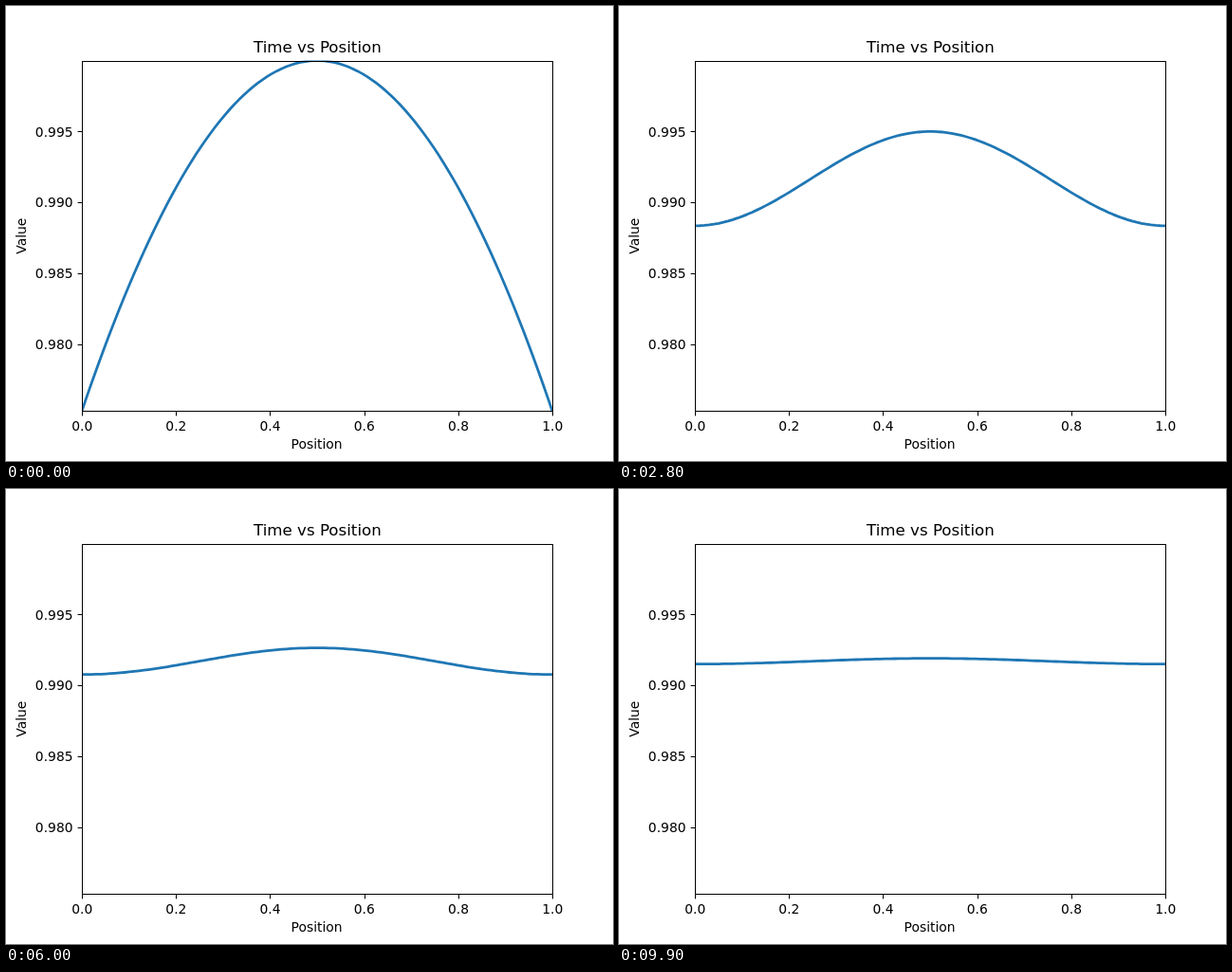
An HTML page that plays this animation: 640x480 px, repeating every 10 s.

```html
<!DOCTYPE html>
<html lang="en">
<head>
<meta charset="utf-8">
<title>Time vs Position</title>
<style>
  html, body { margin: 0; width: 100%; height: 100%; overflow: hidden; background: #fff; }
  svg { display: block; width: 640px; height: 480px; }
  text { font: 13.889px "DejaVu Sans", sans-serif; text-anchor: middle; }
  .title { font-size: 16.667px; }
  .right { text-anchor: end; }
  .axis { fill: none; stroke: #000; stroke-width: 1; }
  #curve { fill: none; stroke: #1f77b4; stroke-width: 2.78; stroke-linejoin: round; stroke-linecap: square; }
</style>
</head>
<body>
<svg viewBox="0 0 640 480">
  <clipPath id="plot"><rect x="80" y="57.6" width="496" height="369.6"/></clipPath>
  <path id="curve" clip-path="url(#plot)"/>
  <rect class="axis" x="80.5" y="58.5" width="496" height="369" shape-rendering="crispEdges"/>
  <g id="ticks"></g>
  <text class="title" x="328.4" y="49">Time vs Position</text>
  <text x="327.6" y="467">Position</text>
  <text transform="translate(21 242.7) rotate(-90)">Value</text>
</svg>
<script>
const LEFT = 80, TOP = 57.6, WIDTH = 496, HEIGHT = 369.6;
const STEP = 100, LOOP = 10000;
const DIFFUSIVITY = 0.01, MODES = 24, SAMPLES = 400, POINTS = 100;
const GRID_LOSS = 1.7e-5; // small offset of the mean from the coarse grid

const initial = x => Math.exp(-0.1 * (x - 0.5) ** 2);
const low = initial(0);
const toX = x => LEFT + WIDTH * x;
const toY = v => TOP + HEIGHT * (1 - v) / (1 - low);

// Cosine coefficients of the starting profile, insulated at both ends
const modes = Array.from({ length: MODES }, (_, n) => {
  let sum = 0;
  for (let i = 0; i < SAMPLES; i++) {
    const x = (i + 0.5) / SAMPLES;
    sum += initial(x) * Math.cos(2 * Math.PI * n * x);
  }
  return sum / SAMPLES * (n ? 2 : 1);
});

function heat(x, t) {
  if (t === 0) return initial(x);
  return modes.reduce((sum, a, n) => {
    const k = 2 * Math.PI * n;
    return sum + a * Math.exp(-DIFFUSIVITY * k * k * t) * Math.cos(k * x);
  }, -GRID_LOSS);
}

function drawTicks() {
  let out = '';
  for (let i = 0; i <= 5; i++) {
    const x = toX(i / 5), px = Math.round(x) + 0.5;
    out += `<path class="axis" d="M${px} 428v4.4"/><text x="${x + 0.2}" y="448">${(i / 5).toFixed(1)}</text>`;
  }
  for (let i = 0; i < 4; i++) {
    const v = 0.98 + 0.005 * i, y = toY(v), py = Math.round(y) + 0.5;
    out += `<path class="axis" d="M80 ${py}h-4.4"/><text class="right" x="70.6" y="${Math.round(y + 5.2)}">${v.toFixed(3)}</text>`;
  }
  document.getElementById('ticks').innerHTML = out;
}

const curve = document.getElementById('curve');
function drawCurve(t) {
  const points = [];
  for (let i = 0; i < POINTS; i++) {
    const x = i / (POINTS - 1);
    points.push(`${toX(x).toFixed(2)} ${toY(heat(x, t)).toFixed(2)}`);
  }
  curve.setAttribute('d', 'M' + points.join('L'));
}

const start = performance.now();
let shown = -1;
function tick() {
  const step = Math.floor((performance.now() - start) % LOOP / STEP);
  if (step !== shown) {
    shown = step;
    drawCurve(step * STEP / 1000);
  }
  requestAnimationFrame(tick);
}

drawTicks();
tick();
</script>
</body>
</html>
```
